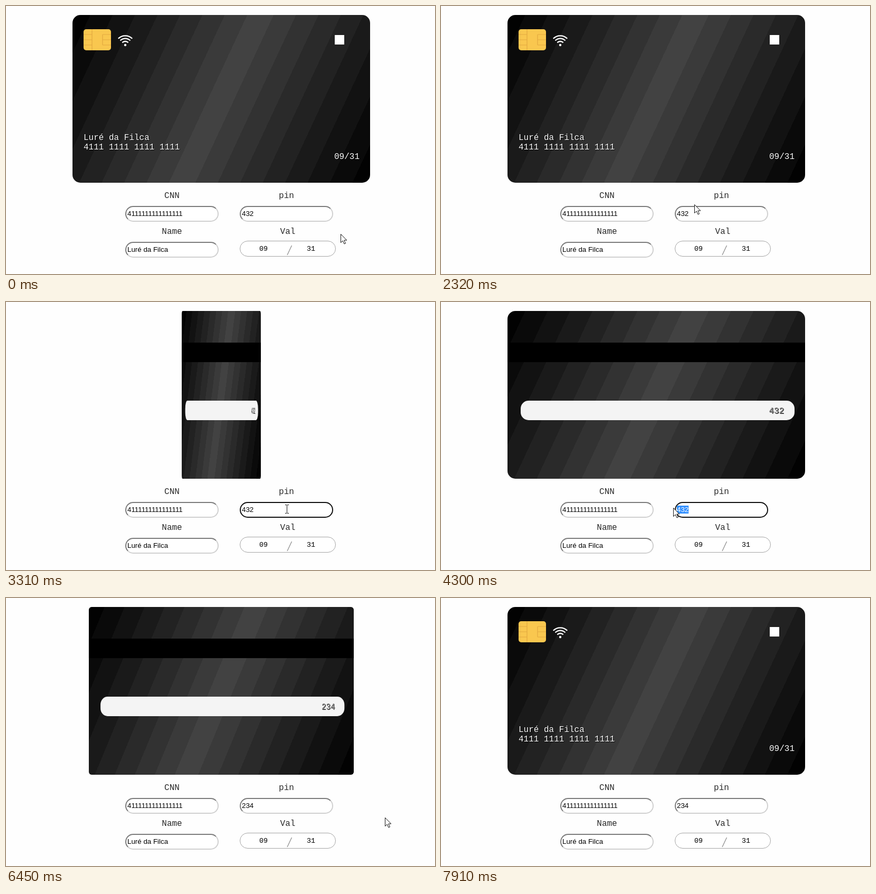
Animation, 813 px wide and 508 px high, one loop 8810 ms. Source, as an HTML page:

```html
<!DOCTYPE html>
<html lang="en">
<head>
<meta charset="utf-8">
<title>Card form</title>
<style>
  html, body { margin: 0; width: 100%; height: 100%; overflow: hidden; background: #fefefe; }
  .field {
    position: absolute; box-sizing: border-box; width: 177px; height: 30px;
    border: 2px solid; border-color: #7b7b7b #d0d0d0 #d0d0d0 #7b7b7b;
    border-radius: 15px; background: #fff;
  }
  .field.focus { border-color: #101010; }
  #val { left: 443px; top: 445px; width: 182px; border: 1px solid #a3a3a3; }
  svg { position: absolute; left: 0; top: 0; }
  text { white-space: pre; }
  .mono { font: 16px "Liberation Mono", "Courier New", monospace; }
  .small { font: 13.333px "Liberation Mono", "Courier New", monospace; }
  .input { font: 13.333px "Liberation Sans", Arial, sans-serif; }
  .mid { text-anchor: middle; }
  .end { text-anchor: end; }
</style>
</head>
<body>
<div class="field" style="left:226px;top:379px"></div>
<div class="field" style="left:443px;top:379px" id="pinBox"></div>
<div class="field" style="left:226px;top:447px"></div>
<div class="field" id="val"></div>

<svg width="813" height="508" viewBox="0 0 813 508">
  <defs>
    <linearGradient id="fine" gradientUnits="userSpaceOnUse"></linearGradient>
    <linearGradient id="coarse" gradientUnits="userSpaceOnUse"></linearGradient>
    <clipPath id="edge"><rect id="edgeRect" width="564" height="318"/></clipPath>
  </defs>

  <g id="card"><g clip-path="url(#edge)">
    <rect id="face" width="564" height="318"/>

    <g id="front">
      <rect x="21" y="27" width="52" height="40" rx="5" fill="#f9c74f"/>
      <path d="M37 27V67M57 37V57M21 37H37M21 47H37M21 57H37M57 37H73M57 47H73M57 57H73"
            fill="none" stroke="#e3aa40" stroke-width="1.2"/>
      <g fill="none" stroke="#fff" stroke-width="2.3" id="waves"></g>
      <circle cx="100" cy="57" r="2.2" fill="#fff"/>
      <rect x="497" y="38" width="18" height="18" fill="#fff"/>
      <g class="mono" id="frontText"></g>
    </g>

    <g id="back">
      <rect y="60" width="564" height="37"/>
      <rect x="25" y="170" width="519" height="37" rx="15" fill="#f4f4f4"/>
      <g class="mono end">
        <text id="codeShadow" x="525" y="195" fill="#111"></text>
        <text id="code" x="524" y="194" fill="#888"></text>
      </g>
    </g>
  </g></g>

  <g class="mono mid" fill="#2a2a2a">
    <text x="314.5" y="364">CNN</text>
    <text x="531.5" y="364">pin</text>
    <text x="314.5" y="432">Name</text>
    <text x="534" y="432">Val</text>
  </g>
  <g class="input">
    <text x="230" y="398">4111111111111111</text>
    <text x="230" y="466">Luré da Filca</text>
    <rect id="selection" y="386" height="15" fill="#3390ff"/>
    <text x="447" y="398"><tspan id="pinPlain"></tspan><tspan id="pinPicked" fill="#fff"></tspan></text>
    <rect id="caret" y="386" width="1" height="15"/>
  </g>
  <g class="small mid">
    <text x="488" y="464">09</text>
    <text x="578" y="464">31</text>
  </g>
  <path d="M533 472L541.5 454" stroke="#999" stroke-width="1.5"/>

  <path id="arrow" d="M.5 .5V16.5L4.2 13L7 19L9.5 18L6.8 12H11.8Z" fill="#fff" stroke="#111"/>
  <path id="beam" d="M-3 -7.5H0M1 -7.5H4M.5 -7V8M-3 8.5H0M1 8.5H4" fill="none" stroke="#111"/>
</svg>

<script>
const LOOP = 8810, STEP = 120, FLIP = 940;
const DIGIT = 7.415, PIN_X = 447;
const $ = id => document.getElementById(id);
const show = (id, on) => $(id).setAttribute('display', on ? 'inline' : 'none');
const set = (id, attrs) => {
  for (const k in attrs) $(id).setAttribute(k, attrs[k]);
};

// Stepped sheen at 115 degrees, mirrored about the card centre.
function sheen(id, width, shades) {
  const a = 115 * Math.PI / 180, dx = Math.sin(a), dy = -Math.cos(a);
  const half = (564 * dx + 318 * dy) / 2;
  set(id, { x1: 282 - half * dx, y1: 159 - half * dy, x2: 282 + half * dx, y2: 159 + half * dy });
  const stops = [];
  shades.forEach((v, i) => {
    const color = `rgb(${v},${v},${v})`;
    const near = i ? 25 + (i - 1) * width : 0;
    const far = i < shades.length - 1 ? 25 + i * width : half / dx;
    for (const d of [near, far]) {
      const o = d * dx / half / 2;
      stops.push([0.5 + o, color]);
      stops.unshift([0.5 - o, color]);
    }
  });
  $(id).innerHTML = stops.map(([o, c]) => `<stop offset="${o}" stop-color="${c}"/>`).join('');
}
sheen('fine', 42.5, [66, 58, 50, 42, 34, 26, 18, 10, 2]);
sheen('coarse', 85, [65, 54, 39, 24, 8]);

$('waves').innerHTML = [18.7, 13.4, 8].map(r => {
  const d = r * Math.SQRT1_2;
  return `<path d="M${100 - d} ${58 - d}A${r} ${r} 0 0 1 ${100 + d} ${58 - d}"/>`;
}).join('');

$('frontText').innerHTML = [
  [21, 237, 'Luré da Filca'], [21, 255, '4111 1111 1111 1111'], [496, 273, '09/31']
].map(([x, y, s]) =>
  `<text x="${x + 1}" y="${y + 1}" fill="#000">${s}</text><text x="${x}" y="${y}" fill="#fff">${s}</text>`
).join('');

// The screen refreshes in even steps counted from these moments.
const bursts = [0, 510, 1480, 2440, 2830, 3810, 4060, 5080, 5930, 6210, 7550];
function stepped(t) {
  const from = bursts.filter(b => b <= t).pop();
  return from + Math.floor((t - from) / STEP) * STEP;
}

// time, x, y of the pointer
const path = [
  [400, 634, 432], [870, 545, 365], [1230, 503, 390], [1360, 503, 390],
  [1900, 324, 198], [2320, 480, 376], [2560, 532, 392], [3940, 532, 392],
  [4180, 460, 393], [4300, 440, 390], [5440, 440, 390], [5680, 695, 402],
  [6090, 695, 402], [6450, 718, 416], [6810, 765, 480], [7430, 765, 480],
  [7790, 774, 500], [7910, 776, 512]
];
function pointer(t) {
  const i = path.findIndex(p => p[0] > t);
  if (i < 0) return path[path.length - 1].slice(1);
  if (i === 0) return path[0].slice(1);
  const [a, b] = [path[i - 1], path[i]];
  const k = (t - a[0]) / (b[0] - a[0]);
  return [1, 2].map(n => Math.round(a[n] + (b[n] - a[n]) * k));
}

// cubic-bezier(.42, 0, .58, 1)
function easeInOut(x) {
  if (x <= 0) return 0;
  if (x >= 1) return 1;
  let lo = 0, hi = 1;
  for (let i = 0; i < 24; i++) {
    const s = (lo + hi) / 2, r = 1 - s;
    if (1.26 * s * r * r + 1.74 * s * s * r + s * s * s < x) lo = s; else hi = s;
  }
  return lo * lo * (3 - 2 * lo);
}

function drawCard(t, pin) {
  const turn = easeInOut((t - 2793) / FLIP) - easeInOut((t - 6197) / FLIP);
  const moving = turn > 0 && turn < 1;
  const c = Math.cos(turn * Math.PI), isFront = c > 0;
  set('card', { transform: `translate(408 17) scale(${Math.max(Math.abs(c), 0.001)} 1) translate(-282 0)` });
  set('edgeRect', { rx: moving ? 6 : 15 });
  set('face', { fill: `url(#${moving && isFront ? 'coarse' : 'fine'})` });
  show('front', isFront);
  show('back', !isFront);
  $('code').textContent = $('codeShadow').textContent = pin;
}

function drawPin(t, pin) {
  const picked = t < 4180 || t >= 5080 ? 0 : t < 4300 ? 1 : 3;
  const plain = pin.length - picked;
  $('pinPlain').textContent = pin.slice(0, plain);
  $('pinPicked').textContent = pin.slice(plain);
  set('selection', { x: PIN_X + plain * DIGIT, width: picked * DIGIT });
  set('caret', { x: Math.floor(PIN_X + pin.length * DIGIT) });
  show('caret', t >= 5080 && t < 5930);
  $('pinBox').classList.toggle('focus', t >= 2830 && t < 6210);
}

function drawPointer(t) {
  const [x, y] = pointer(t);
  const overPin = x > 443 && x < 620 && y > 379 && y < 409;
  show('beam', overPin);
  show('arrow', !overPin);
  set(overPin ? 'beam' : 'arrow', { transform: `translate(${x} ${y})` });
}

function draw(now) {
  const t = stepped(now % LOOP);
  const pin = t < 5080 ? '432' : '234'.slice(0, t < 5320 ? 1 : t < 5440 ? 2 : 3);
  drawCard(t, pin);
  drawPin(t, pin);
  drawPointer(t);
}

const start = performance.now();
function tick() {
  draw(performance.now() - start);
  requestAnimationFrame(tick);
}
tick();
</script>
</body>
</html>
```
